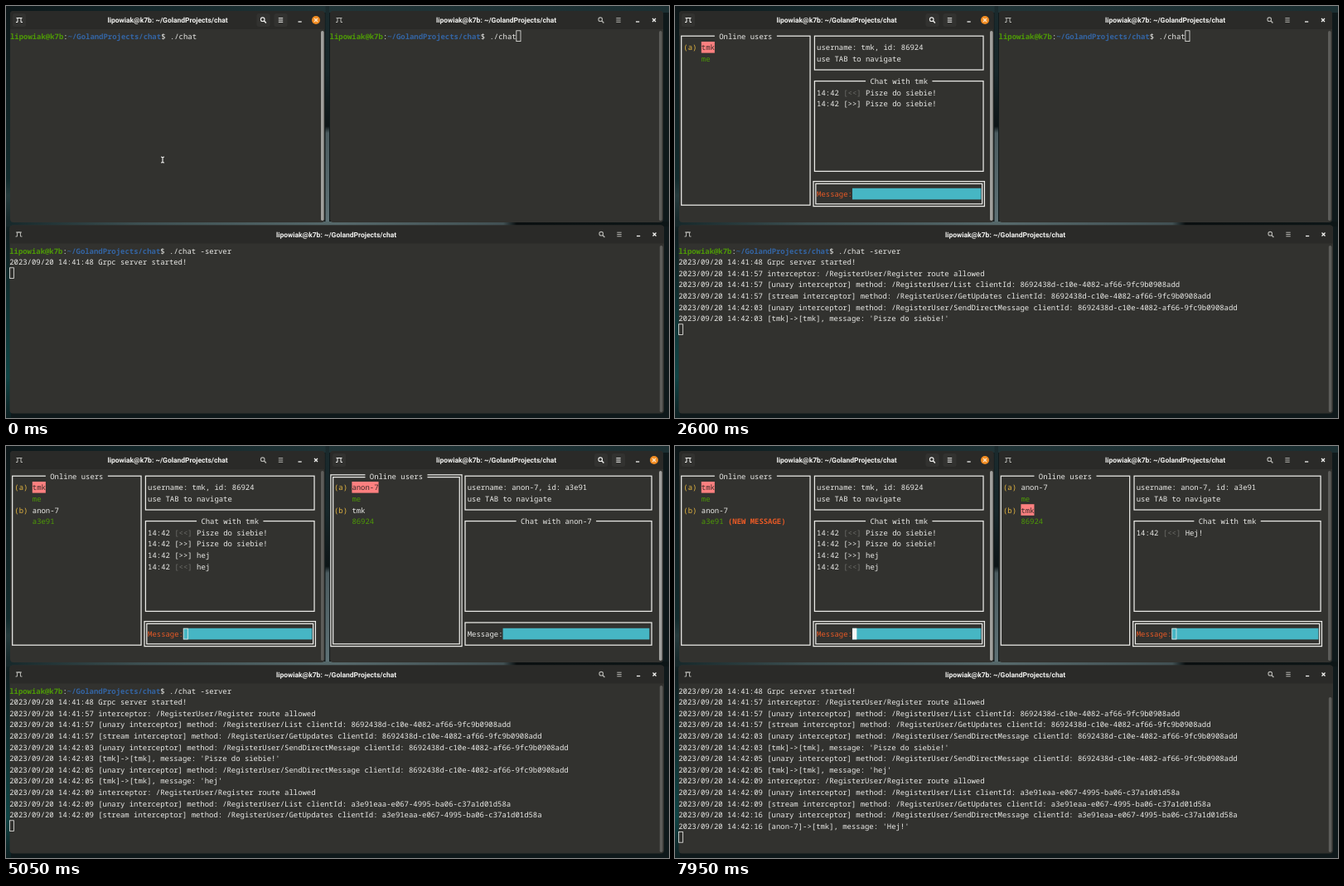
These frames come from a looping animation (800 by 497 pixels, 8000 ms). An HTML page:

```html
<!DOCTYPE html>
<html lang="en">
<head>
<meta charset="utf-8">
<title>Terminal chat</title>
<style>
html, body { margin: 0; width: 100%; height: 100%; overflow: hidden; background: #0f191b; }
svg { display: block; width: 100vw; height: 100vh; }
text { white-space: pre; text-rendering: geometricPrecision; }
.mono { font: 8.93px "Noto Sans Mono", "DejaVu Sans Mono", monospace; }
.title { font: 700 8.5px Roboto, "Open Sans", sans-serif; fill: #f4f4f2; text-anchor: middle; }
.bold { font-weight: 700; }
</style>
</head>
<body>
<svg id="stage" viewBox="0 0 800 497" xmlns="http://www.w3.org/2000/svg">
  <defs>
    <linearGradient id="sky">
      <stop offset="0" stop-color="#0d1719"/><stop offset=".2" stop-color="#13272a"/>
      <stop offset=".5" stop-color="#203437"/><stop offset="1" stop-color="#1b2f32"/>
    </linearGradient>
    <linearGradient id="edge" x2="0" y2="1">
      <stop offset="0" stop-color="#0d1719"/><stop offset=".42" stop-color="#122b2d"/>
      <stop offset=".46" stop-color="#263b3d"/><stop offset=".55" stop-color="#0f1f21"/>
      <stop offset=".9" stop-color="#0f4546"/><stop offset="1" stop-color="#0d2022"/>
    </linearGradient>
    <linearGradient id="gap" x2="0" y2="1">
      <stop offset="0" stop-color="#1a2a2d"/><stop offset=".3" stop-color="#18282b"/>
      <stop offset=".55" stop-color="#0d1517"/><stop offset=".58" stop-color="#4c5c60"/>
      <stop offset="1" stop-color="#5f7276"/>
    </linearGradient>
    <linearGradient id="seam">
      <stop offset="0" stop-color="#16282a"/><stop offset=".2" stop-color="#3d4f51"/>
      <stop offset=".5" stop-color="#56686a"/><stop offset=".75" stop-color="#415053"/>
      <stop offset=".77" stop-color="#0a0f10"/><stop offset="1" stop-color="#0d1617"/>
    </linearGradient>
  </defs>
  <rect width="800" height="497" fill="#0f191b"/>
  <rect width="800" height="8" fill="url(#sky)"/>
  <rect width="6" height="497" fill="url(#edge)"/>
  <rect x="385.5" width="4.5" height="264" fill="url(#gap)"/>
  <rect y="260" width="800" height="6" fill="url(#seam)"/>
  <g id="view"></g>
</svg>
<script>
const CW = 5.358, RH = 13.6, LOOP = 8000;
const BG = '#32322f', HEAD = '#2a2a28', WHITE = '#ebebe8', GREEN = '#4e9a06', BLUE = '#3465a4',
  CYAN = '#46b6c4', PINK = '#ff8080', YELLOW = '#e3b541', ORANGE = '#e95a26', GREY = '#6e6e6a';

const ACCOUNT = 'lipowiak', HOST = 'k7b', ME = 'tmk', PEER = 'anon-7', SITE = 'github.com/bartoltmk';
const DIR = '~/GolandProjects/chat';
const ID_A = '8692438d-c10e-4082-af66-9fc9b0908add', ID_B = 'a3e91eaa-e067-4995-ba06-c37a1d01d58a';
const HELLO = 'Pisze do siebie!';

// Moments of the story, in ms
const T = { formA: 150, nameA: 300, tabA: 500, joinA: 600, msgA: 850, helloA: 1000, sendHello: 2350,
  hej: 2800, sendHej: 3050, focusB: 3350, formB: 3600, nameB: 3800, tabB: 4250, joinB: 4400,
  pickB: 5250, msgB: 5550, hejB: 5750, sendB: 6300, back: 7400 };
const HELLO_STEP = 75, HEJ_STEP = 75, NAME_STEP = 70, HEJB_STEP = 100;

const keys = [-250, T.formA, T.joinA, T.msgA, T.sendHello + 50, T.sendHej, T.focusB, T.formB, T.joinB,
  T.msgB, T.sendB, T.back];
const typing = (start, step, count) => { for (let i = 0; i < count; i++) keys.push(start + i * step); };
typing(T.nameA, NAME_STEP, ME.length);
typing(T.helloA, HELLO_STEP, HELLO.length);
typing(T.hej, HEJ_STEP, 3);
typing(T.nameB, NAME_STEP, PEER.length);
typing(T.hejB, HEJB_STEP, 4);

const typed = (s, t, start, step) => t < start ? '' : s.slice(0, Math.floor((t - start) / step) + 1);
const blinkOn = t => (t - Math.max(...keys.filter(k => k <= t))) % 400 < 200;

const esc = s => s.replace(/&/g, '&amp;').replace(/</g, '&lt;').replace(/>/g, '&gt;');
const rect = (x, y, w, h, fill, extra = '') =>
  `<rect x="${x}" y="${y}" width="${w}" height="${h}" fill="${fill}" ${extra}/>`;
const path = (d, color, width = 1) =>
  `<path d="${d}" fill="none" stroke="${color}" stroke-width="${width}"/>`;

// A character grid: x is the left edge of column 0, y the middle of row 0
function grid(x, y) {
  const X = c => x + c * CW, Y = r => y + r * RH;
  const g = {
    text: (c, r, s, color = WHITE, cls = '') =>
      `<text class="mono ${cls}" x="${X(c)}" y="${Y(r) + 3.5}" fill="${color}">${esc(s)}</text>`,
    fill: (c, r, n, color) => rect(X(c), Y(r) - RH / 2, n * CW, RH, color),
    cursor: (c, r, focused, on) => focused
      ? (on ? g.fill(c, r, 1, '#f6f6f4') : '')
      : rect(X(c) + .2, Y(r) - RH / 2 + .4, CW - .2, RH - .8, 'none', `stroke="${WHITE}" stroke-width=".8"`),
    box(c, r, w, h, title = '', double = false) {
      const l = X(c + .5), t = Y(r), bw = (w - 1) * CW, bh = (h - 1) * RH;
      const line = d => rect(l - d, t - d, bw + 2 * d, bh + 2 * d, 'none', `stroke="${WHITE}" stroke-width="1.25"`);
      let out = double ? line(1.4) + line(-1.4) : line(0);
      if (title) {
        const n = title.length + 2, at = c + Math.floor((w - n) / 2);
        out += rect(X(at), t - 3, n * CW, 6, BG) + g.text(at + 1, r, title);
      }
      return out;
    },
    prompt: cmd => g.text(0, 0, `${ACCOUNT}@${HOST}`, GREEN, 'bold') + g.text(12, 0, ':') +
      g.text(13, 0, DIR, BLUE, 'bold') + g.text(34, 0, '$ ' + cmd)
  };
  return g;
}

function frame(x, y, w, h, focused, right, mid, titleX, bar) {
  const cy = y + 11, icon = focused ? '#f0f0ee' : '#b4b4b0';
  const [search, menu, min, close] = right;
  const tab = x + 11;
  let out = rect(x, y, w, h, BG, 'rx="4"') +
    `<path d="M${x} ${y + 22}v-18q0-4 4-4h${w - 8}q4 0 4 4v18z" fill="${HEAD}"/>`;
  if (focused) for (const b of [tab, search, menu])
    out += rect(b - 8, cy - 8, 16, 16, '#323230', 'rx="2.5"');
  out += path(`M${tab - 4} ${cy + 2.5}h2v-5h4v5h2M${tab - 3.5} ${cy - 2.5}h7`, icon) +
    `<circle cx="${search - .8}" cy="${cy - .8}" r="2.3" fill="none" stroke="${icon}" stroke-width="1.1"/>` +
    path(`M${search + 1} ${cy + 1}l2.4 2.4`, icon, 1.4) +
    path(`M${menu - 2.7} ${cy - 2.3}h5.4m-5.4 2.3h5.4m-5.4 2.3h5.4`, icon) +
    path(`M${min - 2} ${cy + 2}h4.2`, '#f0f0ee', 1.3);
  if (focused) out += `<circle cx="${close}" cy="${cy}" r="5" fill="#f28c22"/>`;
  out += path(`M${close - 2} ${cy - 2}l4 4m0-4l-4 4`, focused ? '#fbe6cc' : '#f4f4f2', 1.3) +
    `<text class="title" x="${titleX}" y="${mid + 3}">${ACCOUNT}@${HOST}: ${DIR}</text>`;
  const [bx, by, bh] = bar;
  return out + rect(bx, by, 3.6, bh, focused ? '#a0a09d' : '#5d5d5a', 'rx="1.8"');
}

function form(g, s, cols) {
  const w = Math.round(cols * .8), end = 7 + w;
  const onButton = s.button;
  return g.text(Math.floor((cols - SITE.length) / 2), 2, SITE, GREEN) +
    g.text(9, 5, 'Username:', YELLOW) + g.fill(18, 5, end - 20, CYAN) + g.text(18, 5, s.name) +
    (onButton ? '' : g.cursor(18 + s.name.length, 5, s.focused, s.on)) +
    g.fill(7, 7, w, onButton ? WHITE : CYAN) + g.text(7 + Math.floor((w - 2) / 2), 7, 'hi', '#2b5fa6');
}

function chat(g, s, cols) {
  const w = cols - 30;
  let out = g.box(0, 0, 30, 16, 'Online users', !s.inMessage);
  s.users.forEach(([name, id, fresh], i) => {
    const r = 1 + 2 * i, picked = name === s.picked;
    if (picked) out += g.fill(5, r, name.length, PINK);
    out += g.text(1, r, `(${'ab'[i]})`, YELLOW) + g.text(5, r, name, picked ? '#3a2a28' : WHITE) +
      g.text(5, r + 1, id, GREEN);
    if (fresh) out += g.text(6 + id.length, r + 1, '(NEW MESSAGE)', ORANGE, 'bold');
  });
  out += g.box(30, 0, w, 4) + g.text(31, 1, `username: ${s.name}, id: ${s.id}`) +
    g.text(31, 2, 'use TAB to navigate') + g.box(30, 4, w, 9, 'Chat with ' + s.picked);
  s.log.forEach(([mark, msg], i) => {
    out += g.text(31, 5 + i, '14:42') + g.text(37, 5 + i, mark, mark === '[<<]' ? GREY : WHITE) +
      g.text(42, 5 + i, msg);
  });
  out += g.box(30, 13, w, 3, '', s.inMessage) +
    g.text(31, 14, 'Message:', s.inMessage ? ORANGE : WHITE) +
    g.fill(39, 14, cols - 40, CYAN) + g.text(39, 14, s.draft);
  return out + (s.inMessage ? g.cursor(39 + s.draft.length, 14, s.focused, s.on) : '');
}

function serverLines(t) {
  const lines = ['2023/09/20 14:41:48 Grpc server started!'];
  const add = (clock, s) => lines.push(`2023/09/20 14:${clock} ${s}`);
  const join = (clock, id) => {
    add(clock, 'interceptor: /RegisterUser/Register route allowed');
    add(clock, '[unary interceptor] method: /RegisterUser/List clientId: ' + id);
    add(clock, '[stream interceptor] method: /RegisterUser/GetUpdates clientId: ' + id);
  };
  const send = (clock, id, from, msg) => {
    add(clock, '[unary interceptor] method: /RegisterUser/SendDirectMessage clientId: ' + id);
    add(clock, `[${from}]->[${ME}], message: '${msg}'`);
  };
  if (t >= T.joinA) join('41:57', ID_A);
  if (t >= T.sendHello) send('42:03', ID_A, ME, HELLO);
  if (t >= T.sendHej) send('42:05', ID_A, ME, 'hej');
  if (t >= T.joinB) join('42:09', ID_B);
  if (t >= T.sendB) send('42:16', ID_B, PEER, 'Hej!');
  return lines;
}

const gridA = grid(5, 36.2), gridB = grid(390.6, 36.2), gridS = grid(4.2, 295);

function paneA(t, focused, on) {
  if (t < T.formA) return gridA.prompt('./chat') + gridA.cursor(42, 0, focused, on);
  if (t < T.joinA)
    return form(gridA, { name: typed(ME, t, T.nameA, NAME_STEP), button: t >= T.tabA, focused, on }, 69);
  const users = [[ME, 'me']], log = [];
  if (t >= T.joinB) users.push([PEER, ID_B.slice(0, 5), t >= T.back]);
  if (t >= T.sendHello) log.push(['[<<]', HELLO], ['[>>]', HELLO]);
  if (t >= T.sendHej) log.push(['[>>]', 'hej'], ['[<<]', 'hej']);
  const draft = t < T.sendHello ? typed(HELLO, t, T.helloA, HELLO_STEP)
    : t < T.sendHej ? typed('hej', t, T.hej, HEJ_STEP) : '';
  return chat(gridA, { users, log, draft, name: ME, id: ID_A.slice(0, 5), picked: ME,
    inMessage: t >= T.msgA, focused, on }, 69);
}

function paneB(t, focused, on) {
  if (t < T.formB) return gridB.prompt('./chat') + gridB.cursor(42, 0, focused, on);
  if (t < T.joinB)
    return form(gridB, { name: typed(PEER, t, T.nameB, NAME_STEP), button: t >= T.tabB, focused, on }, 74);
  const sent = t >= T.sendB;
  return chat(gridB, { users: [[PEER, 'me'], [ME, ID_A.slice(0, 5)]], log: sent ? [['[<<]', 'Hej!']] : [],
    draft: sent ? '' : typed('Hej!', t, T.hejB, HEJB_STEP), name: PEER, id: ID_B.slice(0, 5),
    picked: t >= T.pickB ? ME : PEER, inMessage: t >= T.msgB, focused, on }, 73);
}

function paneServer(t) {
  const lines = serverLines(t), top = t >= T.sendB ? 0 : 1;
  return (top ? gridS.prompt('./chat -server') : '') +
    lines.map((s, i) => gridS.text(0, i + top, s)).join('') +
    gridS.cursor(0, lines.length + top, false);
}

function draw(t) {
  const onB = t >= T.focusB && t < T.back, on = blinkOn(t), scrolled = t >= T.sendB;
  let out = frame(5, 6, 379.5, 255, !onB, [310.5, 331.5, 354.5, 374], 17, 195, [380, 30, 229]) +
    paneA(t, !onB, on) +
    frame(391, 6, 402, 255, onB, [718, 739, 762, 782], 17, 591.5, [788, 30, 229]) +
    paneB(t, onB, on) +
    frame(4.5, 264.5, 789.5, 227, false, [719, 740, 763, 782.5], 275.5, 398.5,
      scrolled ? [788.8, 303, 187] : [788.8, 289, 201]) +
    paneServer(t);
  if (t < 50) out += path('M187 182q2 0 2 1v5q0 1-2 1m4-7q-2 0-2 1m0 5q0 1 2 1', '#f4f4f2', 1.1);
  return out;
}

const view = document.getElementById('view');
const start = performance.now();
let last = '';
function update(now) {
  const next = draw(Math.floor(now % LOOP / 50) * 50);
  if (next !== last) view.innerHTML = last = next;
}
function tick() {
  update(performance.now() - start);
  requestAnimationFrame(tick);
}
tick();
</script>
</body>
</html>
```
